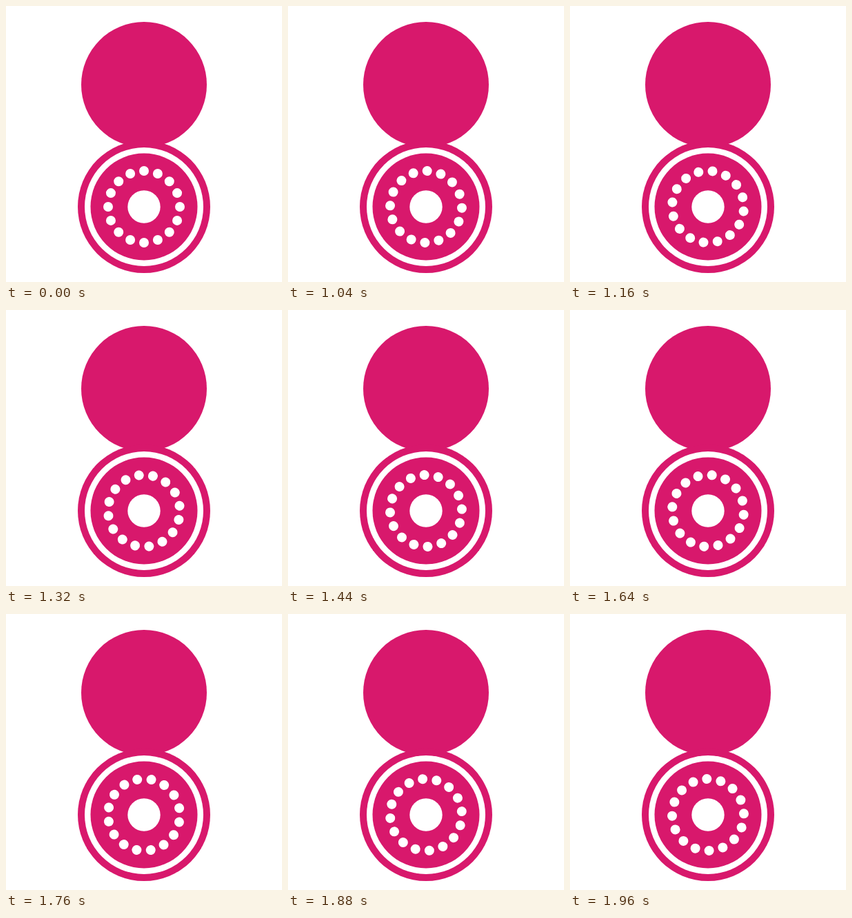
An HTML page for the animation above (2 s loop, 400x400 px).

```html
<!DOCTYPE html>
<html lang="en">
<head>
<meta charset="utf-8">
<title>Rotating dial</title>
<style>
  html, body { margin: 0; height: 100%; overflow: hidden; background: #fff; }
  svg { display: block; width: 100%; height: 100%; }
  .pink { fill: #d8186c; }
  .white { fill: #fff; }
  .dots { fill: none; stroke: #fff; stroke-width: 14; stroke-linecap: round; stroke-dasharray: 0 1; }
</style>
</head>
<body>
<svg viewBox="0 0 400 400">
  <circle class="pink" cx="200" cy="114" r="91"/>
  <g transform="translate(200 291)">
    <circle class="pink" r="96"/>
    <circle class="white" r="86"/>
    <circle class="pink" r="77.5"/>
    <circle class="dots" id="dots" r="52" pathLength="16"/>
    <circle class="white" r="23.7"/>
  </g>
</svg>
<script>
  const LOOP = 2000, REST = 1000, STEP = 40, TURN = 45;
  const dots = document.getElementById('dots');

  // Rest for the first second, then turn 45 degrees in 40 ms steps.
  function draw(now) {
    const time = Math.floor((now % LOOP) / STEP) * STEP;
    const angle = Math.max(0, time - REST) / (LOOP - REST) * TURN;
    dots.setAttribute('transform', `rotate(${angle})`);
    requestAnimationFrame(draw);
  }
  requestAnimationFrame(draw);
</script>
</body>
</html>
```
